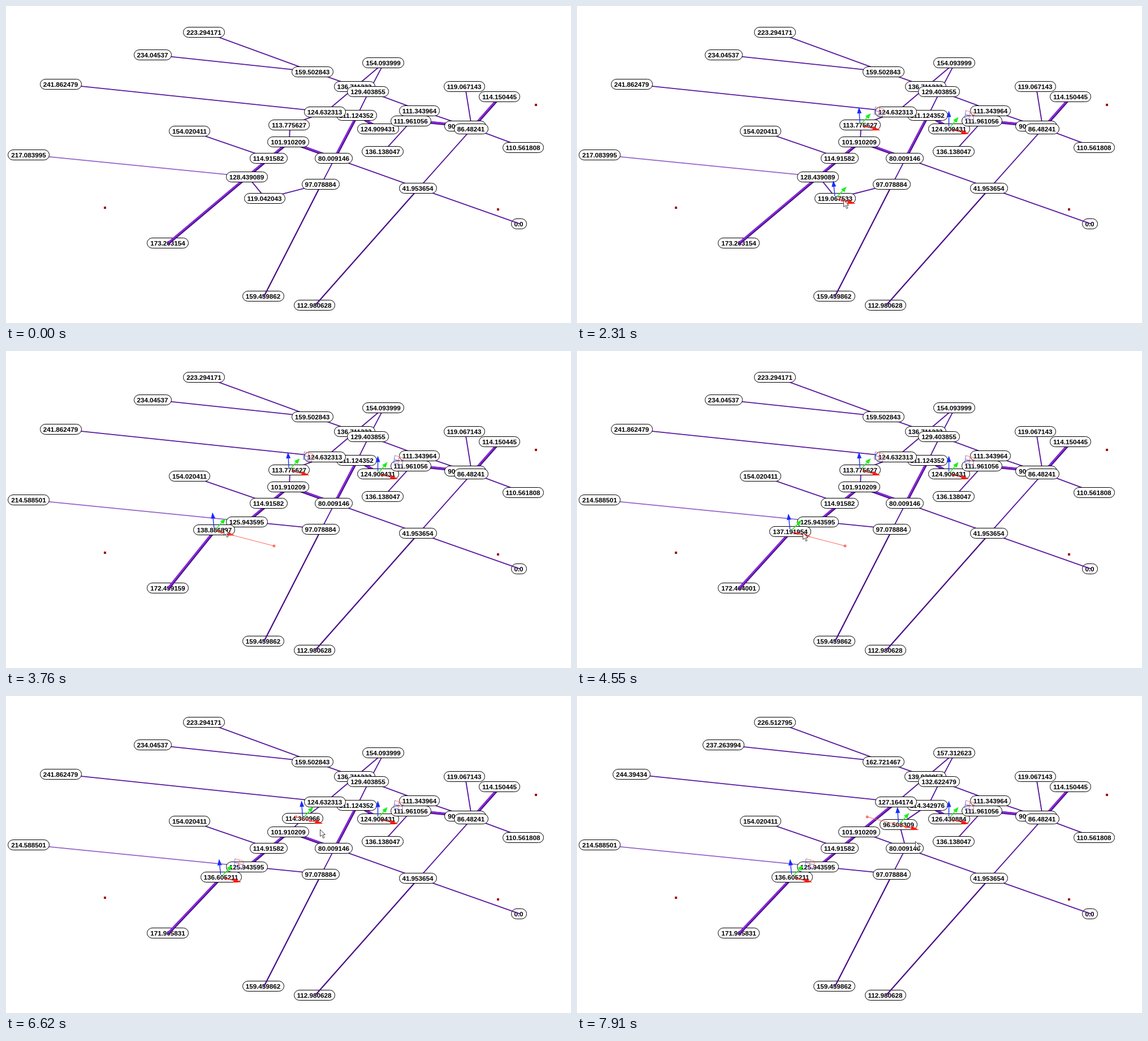
These frames come from a looping animation (999 px wide and 561 px high, 8 s). An HTML page with a canvas:

```html
<!DOCTYPE html>
<html>
<head>
<meta charset="utf-8">
<style>
html, body { margin: 0; width: 100%; height: 100%; overflow: hidden; background: #fff; }
canvas { display: block; }
</style>
</head>
<body>
<canvas id="stage" width="999" height="561"></canvas>
<script>
const ctx = document.getElementById('stage').getContext('2d');
const LOOP = 8000, TICK = 133.65;
const SHOW = 680, POINT = 960, GRAB = 2310, SPLIT = 2700, DROP = 4670, REGRAB = 5960, MERGE = 7640;

// key: [x, y, distance], in stacking order
const nodes = {
  o: [286, 420, 173.203154], t: [454.5, 514, 159.459862],
  v: [545, 530, 112.980628], w: [906.5, 386, '0.0'],
  a: [350, 47, 223.294171], b: [259, 87, 234.04537],
  c: [541.5, 117, 159.502843], d: [96.5, 139, 241.862479],
  e: [667, 100.5, 154.093999], f: [616, 143, 136.711233],
  g: [640, 152, 129.403855], i: [619.5, 193.5, 111.124352],
  h: [563.5, 188, 124.632313], j: [500.5, 211, 113.775627],
  k: [499, 241, 101.910209], l: [464, 270, 114.91582],
  m: [425.5, 302.5, 128.439089], n: [457, 341.5, 119.042043],
  p: [324.5, 222, 154.020411], q: [40, 264, 217.083995],
  r: [579.5, 270, 80.009146], s: [556, 315.5, 97.078884],
  u: [728, 323, 41.953654], F: [657.5, 217.5, 124.909431],
  x: [715.5, 203.5, 111.961056], y: [731, 185.5, 111.343964],
  z: [812, 213, '90.5123648'], A: [822, 217.5, 86.48241],
  B: [810, 143, 119.067143], C: [872.5, 160.5, 114.150445],
  D: [914, 251, 110.561808], E: [666, 258, 136.138047]
};

// key poses: [time, x, own distance, distance of the end node]
const leftDrag = [
  [2160, 457, 119.042043, 173.203154], [2600, 455, 119.124207, 173.203154],
  [2690, 437, 134.912756, 172.483215], [2820, 419, 135.8008, 172.461136],
  [3110, 419, 135.8008, 172.461136], [3480, 369, 138.751249, 172.497352],
  [3900, 368, 138.95, 172.5], [4290, 377, 137.191954, 172.464001],
  [4600, 377, 137.191954, 172.464001], [4690, 380, 136.605211, 171.905831]
];
const rightDrag = [
  [6200, 500.5, 113.775627], [7000, 552, 115.030036], [7260, 552, 115.030036],
  [7600, 563, 115.276413], [7640, 565, 96.614278], [7740, 568.5, 96.508309]
];
// key points: [time, x, y]
const pointer = [
  [960, 513, 234], [1230, 441, 331], [1360, 463, 348], [1640, 464, 348], [1890, 473, 345],
  [2560, 470, 341], [2820, 415, 320], [3110, 415, 320], [3480, 386, 314], [3900, 384, 314],
  [4290, 398, 321], [4600, 399, 321], [5030, 533, 217], [5570, 511, 214], [5770, 525, 222],
  [7010, 572, 243], [7240, 576, 247], [7760, 591, 255], [7900, 598, 257]
];

// linear blend between keys, without the time
function at(keys, t) {
  const n = keys.findIndex(k => k[0] > t);
  if (n < 0) return keys[keys.length - 1].slice(1);
  if (n === 0) return keys[0].slice(1);
  const a = keys[n - 1], b = keys[n], f = (t - a[0]) / (b[0] - a[0]);
  return a.map((v, i) => v + (b[i] - v) * f).slice(1);
}

function path(points, fill, stroke, width = 1) {
  ctx.beginPath();
  points.forEach(p => ctx.lineTo(p[0], p[1]));
  if (fill) { ctx.closePath(); ctx.fillStyle = fill; ctx.fill(); }
  if (stroke) { ctx.strokeStyle = stroke; ctx.lineWidth = width; ctx.stroke(); }
}

// the network sits slightly right of and above its labels
function edges(now, keys, color, width) {
  for (const key of keys.split(' '))
    path([...key].map(k => [now[k][0] + 1.8, now[k][1] - .6]), null, color, width);
}

const thin = (now, keys) => edges(now, keys, '#5a189f', 1.9);

function thick(now, keys) {
  edges(now, keys, '#4c108c', 4.8);
  ctx.save();
  ctx.translate(-.6, -.9);
  edges(now, keys, '#8a2cdb', 2.8);
  ctx.restore();
}

function label([x, y, value]) {
  const text = typeof value === 'string' ? value : String(+value.toFixed(6));
  const w = Math.round(ctx.measureText(text).width + 12);
  ctx.beginPath();
  ctx.roundRect(Math.round(x - w / 2) + .5, Math.round(y) - 9.5, w - 1, 18, 9);
  ctx.fillStyle = '#fff';
  ctx.fill();
  ctx.strokeStyle = '#000';
  ctx.lineWidth = 1;
  ctx.stroke();
  ctx.fillStyle = '#000';
  ctx.fillText(text, x, Math.round(y) + 4);
}

function arrow(x, y, dx, dy, head, half, color) {
  const len = Math.hypot(dx, dy), ux = dx / len, uy = dy / len;
  const tx = x + dx, ty = y + dy, bx = tx - ux * head, by = ty - uy * head;
  path([[x + ux * 5, y + uy * 5], [bx, by]], null, color, 1.4);
  path([[tx, ty], [bx - uy * half, by + ux * half], [bx + uy * half, by - ux * half]], color);
}

function plane(x, y) {
  const pt = (u, v) => [x + u * 7.5 - v, y + u * 2 + v * 6.5];
  for (const k of [-1, 0, 1]) {
    path([pt(-1, k), pt(1, k)], null, k < 0 ? '#f58080' : '#7070f0');
    path([pt(k, -1), pt(k, 1)], null, k < 0 ? '#7070f0' : '#f07070');
  }
}

// while dragged, a line to the start of the drag replaces the plane handle
function gizmo([x, y], tilt, start) {
  arrow(x, y, -tilt, -32, 11, 4, '#1a2cff');
  arrow(x, y, 17 + tilt, -21, 10, 4, '#1cf01c');
  arrow(x, y, 36, 9, 14, 3.8, '#ff1a10');
  if (!start) return plane(x + 36.5 - tilt * 1.5, y - 24);
  const grip = [x + 13, y + 3.5];
  path([start, grip], null, '#ff6558');
  ctx.strokeStyle = '#f5382c';
  for (const p of [start, grip])
    ctx.strokeRect(Math.round(p[0]) - 1.5, Math.round(p[1]) - 1.5, 3, 3);
}

function cursor([x, y]) {
  const shape = [[0, 0], [0, 12], [3, 9.5], [5, 15], [7.5, 14], [5, 9], [9, 9], [0, 0]];
  ctx.save();
  ctx.translate(Math.round(x) + .5, Math.round(y) + .5);
  path(shape, '#fff', '#444');
  ctx.restore();
}

function network(t, step) {
  const now = {};
  for (const k in nodes) now[k] = [...nodes[k]];
  const add = (keys, v) => [...keys].forEach(k => now[k][2] += v);

  const [nx, own, end] = at(leftDrag, step), [jx, jv] = at(rightDrag, step);
  now.n = [nx, 341 + (nx - 457) * .265, own];
  now.j = [jx, 211 + (jx - 500.5) * .25, jv];
  now.o[2] = end;
  if (t >= SPLIT) add('mq', -2.495494);
  if (t >= MERGE) {
    add('abcefgi', 3.2186237);
    add('dh', 2.531861);
    add('F', 1.521453);
  }
  return now;
}

function draw(t) {
  const step = POINT + Math.floor((t - POINT) / TICK + .2) * TICK;
  const now = network(t, step), keys = Object.keys(now);
  const split = t >= SPLIT, merged = t >= MERGE;
  ctx.fillStyle = '#fff';
  ctx.fillRect(0, 0, 999, 561);
  ctx.font = 'bold 11.7px "Liberation Sans", Arial, sans-serif';
  ctx.textAlign = 'center';
  ctx.lineCap = 'round';

  ctx.fillStyle = '#a0000c';
  for (const [x, y] of [[937, 175], [175, 357], [870, 360]]) ctx.fillRect(x - 2, y - 2, 4, 4);

  keys.slice(0, 4).forEach(k => label(now[k]));
  edges(now, 'qm', '#9564cc', 1.6);
  edges(now, 'st uv', '#4b1088', 2.3);
  thin(now, 'ac bc cg gy yz zD eg eh dh lp gi rs ru uw uA AB xE');
  thin(now, split ? 'ms' : 'mn ns');
  thin(now, merged ? 'jr ij kr' : 'hj jk');
  thick(now, 'AC hi iF xz kl lm');
  thick(now, split ? 'mn no' : 'mo');
  thick(now, merged ? 'hk' : 'kr ir');
  keys.slice(4).forEach(k => label(now[k]));

  if (t >= SHOW) {
    gizmo(now.j, 2, t >= REGRAB && [513, 214]);
    gizmo(now.F, 0);
    gizmo(now.n, 3.3, t >= GRAB && t < DROP && [474, 345]);
  }
  if (t >= POINT) cursor(at(pointer, step));
}

function tick() {
  draw(performance.now() % LOOP);
  requestAnimationFrame(tick);
}
tick();
</script>
</body>
</html>
```
